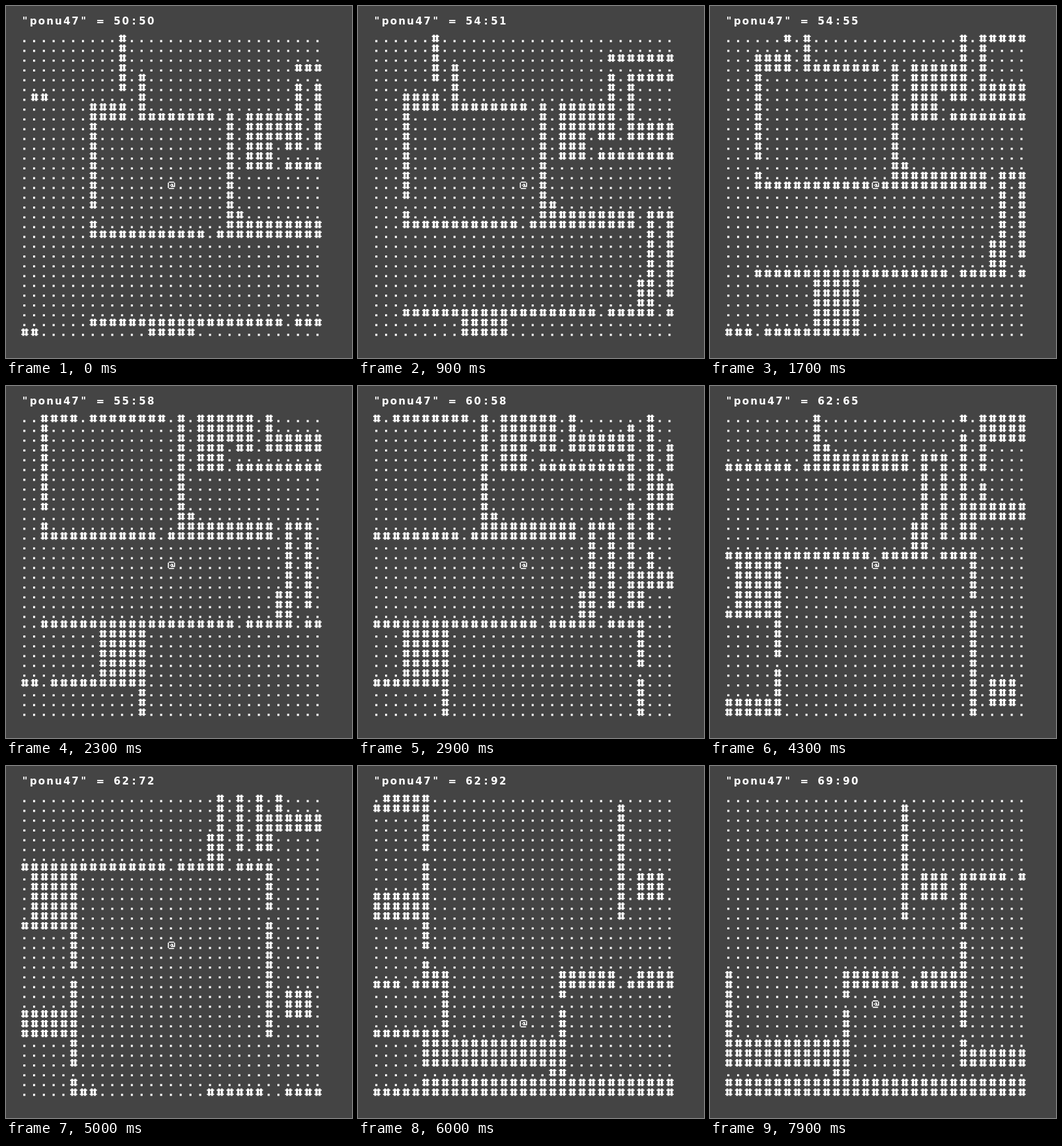
An HTML page with a canvas for the animation above (8000 ms loop, 524 by 532 pixels).

```html
<!DOCTYPE html>
<html lang="en">
<head>
<meta charset="utf-8">
<title>Text dungeon</title>
<style>
  html, body { margin: 0; width: 100%; height: 100%; overflow: hidden; background: #444; }
  canvas { display: block; }
</style>
</head>
<body>
<canvas id="stage" width="524" height="532"></canvas>
<script>
const ctx = document.getElementById('stage').getContext('2d');
const LOOP = 8000, VIEW = 31, HALF = 15, MAP_SIZE = 100;
const PITCH = 14.8, LEFT = 23, TOP = 43.5;
const DOT = 12.7 / 8; // one dot of the 8 x 8 character cell

// Dungeon: walls are filled blocks given by two inclusive corners.
const walls = new Set();
const cellKey = (x, y) => y * MAP_SIZE + x;
function block(x1, y1, x2, y2) {
  for (let y = y1; y <= y2; y++)
    for (let x = x1; x <= x2; x++) walls.add(cellKey(x, y));
}
const across = (y, x1, x2) => block(x1, y, x2, y);
const down = (x, y1, y2) => block(x, y1, x, y2);
const open = (x, y) => walls.delete(cellKey(x, y));

// Starting room and the passage above it
down(45, 35, 40);
down(47, 39, 42);
across(41, 36, 37);
block(42, 42, 45, 43);
across(43, 47, 54);
down(42, 44, 54);
open(42, 53);
across(55, 42, 65);
open(54, 55);
down(56, 43, 54);
across(53, 56, 57);
across(54, 56, 65);

// Rooms to the north-east
block(58, 43, 60, 48);
block(61, 43, 63, 45);
across(46, 62, 63);
across(48, 62, 71);
across(38, 63, 69);
down(63, 40, 42);
down(65, 40, 46);
across(40, 65, 69);
block(65, 45, 71, 46);
down(71, 44, 62);
open(71, 51);
down(73, 43, 58);
open(73, 56);
across(49, 73, 74);
block(73, 50, 77, 52);
block(75, 46, 77, 48);
block(71, 59, 77, 60);
block(71, 61, 72, 62);

// Corridors and the long middle wall
across(54, 67, 69);
down(67, 54, 64);
down(69, 54, 62);
down(66, 61, 63);
across(64, 42, 72);
open(62, 64);
open(68, 64);
across(65, 35, 36);
block(48, 65, 52, 69);
across(70, 39, 52);
open(42, 70);

// Great hall
down(52, 71, 87);
open(52, 75);
open(52, 85);
block(47, 79, 52, 81);
down(72, 65, 81);
open(72, 69);
block(74, 77, 76, 79);

// Southern rooms
across(87, 52, 54);
across(88, 47, 54);
open(50, 88);
down(54, 87, 93);
across(93, 47, 54);
block(66, 87, 71, 88);
down(66, 89, 93);
open(66, 90);
block(52, 94, 66, 96);
across(97, 65, 66);
across(98, 52, 84);
across(99, 47, 84);
across(77, 78, 84);
open(83, 77);
down(78, 77, 96);
open(78, 83);
open(78, 93);
across(87, 74, 78);
across(88, 73, 78);
block(78, 95, 84, 96);

// Walk: single key presses, and held keys that repeat twice per tick.
const moves = [];
const press = (dx, dy, ...times) => times.forEach(t => moves.push({ t, dx, dy }));
function hold(dx, dy, from, to) {
  for (let t = from; t <= to; t += 100) press(dx, dy, t, t);
}
press(1, 0, 100, 300, 400, 800);
press(0, 1, 900, 1000, 1300, 1500, 1700, 1800, 1900, 2100);
press(1, 0, 2300, 2400, 2500, 2700, 2800, 2900, 3100, 3200);
press(0, 1, 3400, 3500, 3700, 3800, 3900, 4100, 4300, 4700);
hold(0, 1, 4800, 6000);
press(0, 1, 6500);
press(0, -1, 6800, 6900, 7100);
press(1, 0, 7300);
hold(1, 0, 7700, 7900);

function heroAt(time) {
  const hero = { x: 50, y: 50 };
  for (const { t, dx, dy } of moves) {
    if (t > time) break;
    hero.x += dx;
    hero.y += dy;
  }
  return hero;
}

// Each symbol is a few bars on the dot grid: x, y, width, height.
const WALL = [[1, 0, 2, 7], [4, 0, 2, 7], [0, 1, 7, 1], [0, 5, 7, 1]];
const FLOOR = [[2, 5, 2, 2]];
const HERO = [[1, 0, 5, 1], [0, 1, 1, 5], [6, 1, 1, 4], [3, 2, 2, 1],
              [2, 3, 1, 1], [4, 3, 1, 1], [3, 4, 3, 1], [1, 6, 5, 1]];

function drawSymbol(bars, col, row) {
  const left = LEFT + col * PITCH, top = TOP + row * PITCH;
  ctx.beginPath();
  for (const [x, y, w, h] of bars)
    ctx.rect(left + x * DOT, top + y * DOT, w * DOT, h * DOT);
  ctx.fill();
}

function drawTitle(text) {
  ctx.font = 'bold 15px "DejaVu Sans", sans-serif';
  ctx.textAlign = 'center';
  [...text].forEach((char, i) => ctx.fillText(char, LEFT + 5.6 + i * 12.7, 28));
}

function draw(time) {
  const hero = heroAt(time);
  const left = hero.x - HALF;
  const top = Math.min(hero.y - HALF, MAP_SIZE - VIEW);
  ctx.fillStyle = '#444';
  ctx.fillRect(0, 0, 524, 532);
  ctx.fillStyle = '#fff';
  drawTitle(`"ponu47" = ${hero.x}:${hero.y}`);
  for (let row = 0; row < VIEW; row++) {
    for (let col = 0; col < VIEW; col++) {
      const x = left + col, y = top + row;
      const isHero = x === hero.x && y === hero.y;
      drawSymbol(isHero ? HERO : walls.has(cellKey(x, y)) ? WALL : FLOOR, col, row);
    }
  }
}

const start = performance.now();
function tick() {
  draw((performance.now() - start) % LOOP);
  requestAnimationFrame(tick);
}
tick();
</script>
</body>
</html>
```
